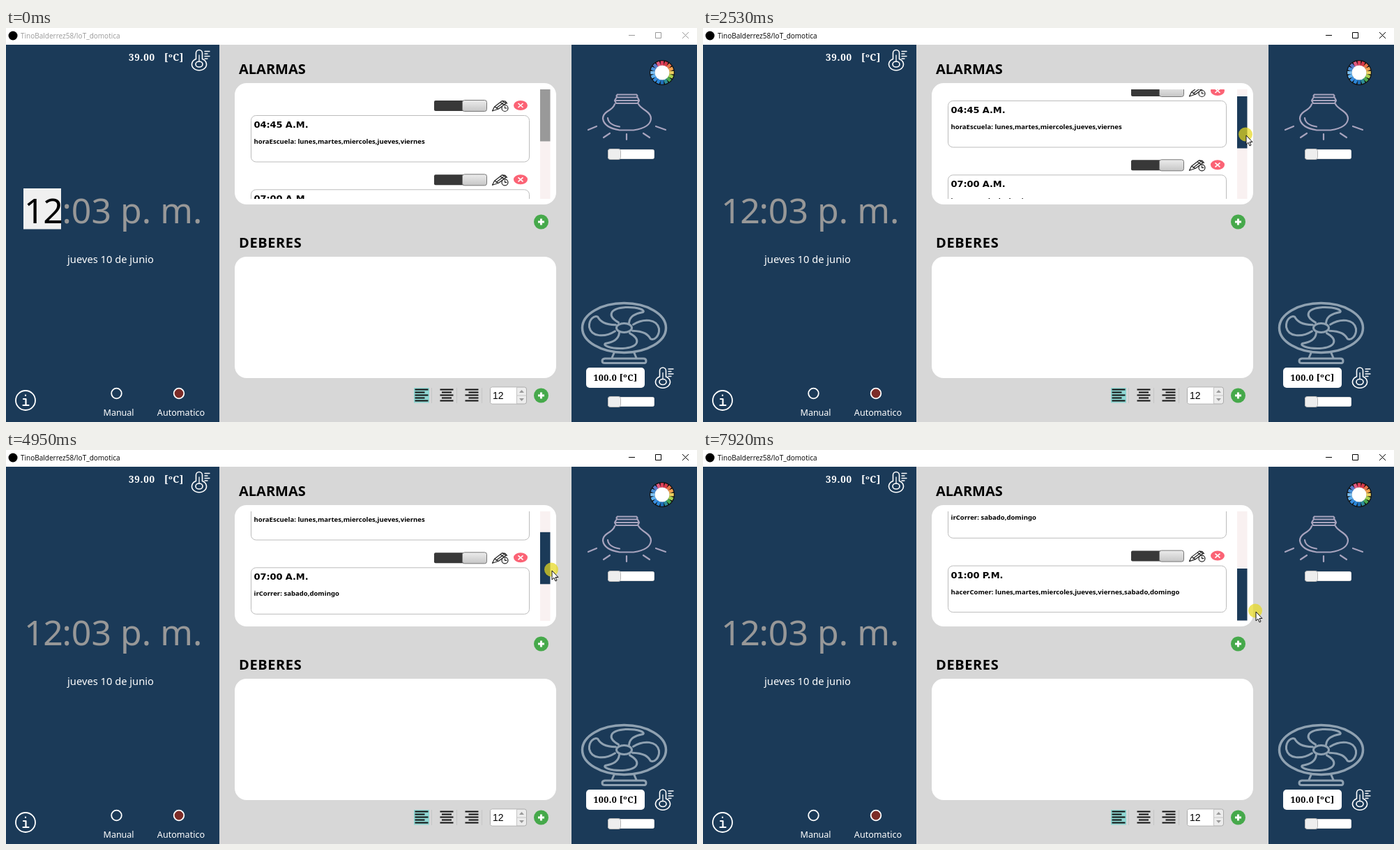
An HTML page that plays this animation: 991 px wide and 565 px high, repeating every 8 s.

```html
<!DOCTYPE html>
<html lang="es">
<head>
<meta charset="utf-8">
<style>
  html, body { margin: 0; width: 100%; height: 100%; overflow: hidden; }
  svg { display: block; width: 991px; height: 565px; font-family: "Noto Sans", sans-serif; }
  .line { fill: none; stroke-linecap: round; stroke-linejoin: round; }
  .bold { font-weight: 700; }
  .mid { text-anchor: middle; }
  .serif { font: 700 13.5px "Noto Serif", serif; }
  .time { font: 700 13px "DejaVu Sans", sans-serif; letter-spacing: -.1px; }
  .desc { font-weight: 700; font-size: 9.55px; }
  #frame { color: #999; }
  #thumb { fill: #999; }
  .active #frame { color: #000; }
  .active #thumb { fill: #1b3a58; }
  .active #hour { fill: #989898; }
  .active #mark { display: none; }
</style>
</head>
<body>
<svg id="app" viewBox="0 0 991 565">
  <defs>
    <linearGradient id="knob" x2="0" y2="1">
      <stop stop-color="#ececec"/><stop offset="1" stop-color="#c6c6c6"/>
    </linearGradient>
    <clipPath id="view"><rect x="351" y="88" width="430" height="157"/></clipPath>
    <g id="thermo" class="line" stroke="#fff" stroke-width="1.6">
      <path d="M-4.5-7.5V-16a4.5 4.5 0 0 1 9 0V-7.5A10.5 8.5 0 1 1-4.5-7.5Z"/>
      <ellipse rx="5" ry="4"/>
      <path d="M0-4V-13M8-18.5h7M8-15h4M8-11.5h7M8-8h4" stroke-width="1.3"/>
    </g>
    <g id="plus">
      <circle r="10.5" fill="#46a94b"/>
      <path d="M-4.5 0h9M0-4.5v9" stroke="#fff" stroke-width="3"/>
    </g>
    <g id="slider">
      <rect x=".5" y=".5" width="66" height="13" rx="2" fill="#fff" stroke="#ddd"/>
      <rect x=".5" y="-.5" width="18" height="15" rx="3" fill="#eee" stroke="#b5b5b5"/>
    </g>
    <g id="tools">
      <rect x="614" y="104" width="46" height="15" rx="2" fill="#383838"/>
      <rect x="654.5" y="103.500" width="35" height="16" rx="3" fill="url(#knob)" stroke="#777"/>
      <g class="line" stroke="#222" stroke-width="1.2">
        <path d="M697.500 119l3-6 11-8.500 5.500 3.500-10.500 8zM701 113l5 3M703 115l10-7.500M709 106.500l5 3.500M712 104.500l4 .5 2.500 3"/>
        <circle cx="715.500" cy="115" r="4.500" fill="#fff"/>
        <path d="M715.500 112.500v2.500h2.500"/>
      </g>
      <ellipse cx="738" cy="111" rx="10" ry="7" fill="#fb6375"/>
      <path d="M734.500 108l7 6m0-6l-7 6" stroke="#fff" stroke-width="1.600"/>
      <rect x="351.500" y="125.500" width="399" height="66.500" rx="7" fill="#fff" stroke="#bcbcbc"/>
    </g>
    <path id="blade" d="M-8-13C-24-28-22-47 2-50C20-51 31-43 27-38C15-34 8-28 7-12" vector-effect="non-scaling-stroke"/>
  </defs>

  <rect width="991" height="565" fill="#fff"/>
  <rect y="24" width="991" height="541" fill="#1b3a58"/>
  <rect x="306" y="24" width="505" height="541" fill="#d7d7d7"/>

  <circle cx="10" cy="11" r="6.500" fill="#000"/>
  <g id="frame">
    <text x="21" y="14.500" font-size="10" font-family="Open Sans, sans-serif" fill="currentColor">TinoBalderrez58/IoT_domotica</text>
    <path d="M893 10.500h9M931.500 6.500h8v8h-8zM970 6l9 9m0-9l-9 9" fill="none" stroke="currentColor"/>
  </g>

  <g fill="#fff">
    <text class="serif" x="176" y="47" letter-spacing=".7">39.00</text>
    <text class="serif" x="227" y="47" letter-spacing=".4">[ºC]</text>
    <text class="mid" x="150" y="337" font-size="14.700">jueves 10 de junio</text>
    <text class="mid" x="161.500" y="555.500" font-size="12.600" letter-spacing="-.1">Manual</text>
    <text class="mid" x="251" y="555.500" font-size="12.600">Automatico</text>
  </g>
  <use href="#thermo" x="277" y="52"/>
  <rect id="mark" x="25" y="230" width="54" height="58.500" fill="#f0f0f0"/>
  <text x="26" y="280" font-size="50" fill="#989898"><tspan id="hour" fill="#000" letter-spacing="-1.400">12</tspan>:03 p. m.</text>
  <g class="line" stroke="#fff" stroke-width="1.800">
    <circle cx="28" cy="534" r="14"/>
    <path d="M25 532h3.500v9M24.500 541h8M28 526.500v.5" stroke-width="2.200"/>
    <circle cx="158.500" cy="524" r="7.300"/>
    <circle cx="248" cy="524" r="7.300" fill="#7c2c28"/>
  </g>

  <text class="bold" x="334" y="66" font-size="20">ALARMAS</text>
  <text class="bold" x="334" y="314.500" font-size="20" letter-spacing=".6">DEBERES</text>
  <rect x="328" y="79" width="461" height="174" rx="17" fill="#fff"/>
  <rect x="328" y="328" width="461" height="174" rx="17" fill="#fff"/>
  <g clip-path="url(#view)"><g id="list"></g></g>
  <rect x="766" y="88" width="14.500" height="157" fill="#f9f1f1"/>
  <rect id="thumb" x="766" y="88" width="14.500" height="74.500"/>
  <use href="#plus" x="767.500" y="278"/>
  <use href="#plus" x="767.500" y="527"/>

  <rect x="585" y="516" width="22" height="21.500" fill="#8fd6d2"/>
  <path d="M610.500 516v22M646.500 516v22M682.500 516v22" stroke="#c5c5c5"/>
  <g id="aligns" stroke="#111" stroke-width="2"></g>
  <rect x="694.500" y="515" width="52" height="24" rx="3" fill="#ececec" stroke="#aaa"/>
  <path d="M697 515.500h35v23h-35q-2 0-2-2v-19q0-2 2-2z" fill="#fff"/>
  <path d="M732.500 515v24M732.500 527h14" stroke="#c4c4c4"/>
  <path d="M736 523l3.500-4 3.500 4zM736 531l3.500 4 3.500-4z" fill="#999"/>
  <text x="698" y="532" font-size="14" font-family="Liberation Sans, sans-serif">12</text>

  <g transform="translate(941 64)">
    <circle r="18" fill="#111"/>
    <g id="wheel" fill="none" stroke-width="6.500"></g>
    <circle r="10.500" fill="#fff"/>
  </g>
  <g class="line" stroke="#a7a3bd" stroke-width="2.200">
    <path d="M877 95.500h27q3 2 0 4h-27q-3-2 0-4M874 104h33M875 100.500l-2 3.500 2 4h31l2-4-2-4M873 109Q872 114 862 120Q856 124 856 130Q858 143 880 146.500H900Q924 143 925 130Q925 124 918 119Q909 113 907 109"/>
    <path d="M863 129Q864 139 880 141.500M835 146l12-5M857 157l9-6M890 152v8M914 151l9 6M932 141l14 5"/>
  </g>
  <use href="#slider" x="863" y="174"/>
  <g class="line" stroke="#8fa1b1" stroke-width="3">
    <ellipse cx="886.500" cy="430" rx="60" ry="35.500" stroke-width="3.500"/>
    <g id="fan" transform="translate(886.500 430) scale(1 .59)"></g>
    <ellipse cx="886.500" cy="430" rx="11" ry="6.500"/>
    <path d="M872 466l-3 7M901 466l3 7M859 474h55q4 0 4 3.500t-4 3h-55q-4 0-4-3t4-3.500z"/>
  </g>
  <rect x="832" y="487" width="84" height="29" rx="5" fill="#fff"/>
  <text class="serif mid" x="874" y="506" style="font-size:12.500px" letter-spacing=".4">100.0 [ºC]</text>
  <use href="#thermo" x="942" y="507.500"/>
  <use href="#slider" x="863" y="529"/>

  <g id="cursor">
    <circle cx="-1" cy="-1.500" r="10" fill="#e6d820" fill-opacity=".72"/>
    <path d="M0 0V13L3 10.200L5 15L7 14L5 9.500H9Z" fill="#fff" stroke="#111" stroke-width="1"/>
  </g>
</svg>
<script>
const $ = id => document.getElementById(id);

const alarms = [
  ['04:45 A.M.', 'horaEscuela: lunes,martes,miercoles,jueves,viernes'],
  ['07:00 A.M.', 'irCorrer: sabado,domingo'],
  ['01:00 P.M.', 'hacerComer: lunes,martes,miercoles,jueves,viernes,sabado,domingo']
];
$('list').innerHTML = alarms.map(([time, desc], i) => `
  <g transform="translate(0 ${i * 106.3})"><use href="#tools"/>
  <text class="time" x="355.5" y="143">${time}</text>
  <text class="desc" x="355.5" y="166">${desc}</text></g>`).join('');

// Text alignment buttons: left, centre, right
$('aligns').innerHTML = [0, 1, 2].map(k => [0, 1, 2, 3, 4].map(i => {
  const width = i % 2 ? 14 : 19;
  const x = 586.5 + k * 36 + (19 - width) * k / 2;
  return `<path d="M${x} ${518.5 + i * 4}h${width}"/>`;
}).join('')).join('');

const hues = ['#e0405a', '#d93a4a', '#e8734a', '#f0a050', '#ecd060', '#a8d050', '#4caa50', '#2e8f9a',
  '#1f6fb8', '#2b86d8', '#3a8fe0', '#5fb0f0', '#7cc0f4', '#4a90d8', '#5a78c8', '#e05a80'];
$('wheel').innerHTML = hues.map((c, i) =>
  `<path d="M-2.3-13.5h4.600" stroke="${c}" transform="rotate(${i * 22.5})"/>`).join('');

$('fan').innerHTML = [0, 90, 180, 270].map(a => `<use href="#blade" transform="rotate(${a})"/>`).join('');

const LOOP = 8000, SHOW = 390, PRESS = 1730, GRAB_Y = 143.5, MAX_SCROLL = 82;
// Pointer path: time, x, y
const path = [
  [390, 905, 500], [1180, 790, 217], [1250, 789, 209], [1730, 778, GRAB_Y], [1930, 778, GRAB_Y],
  [2130, 779, 148.5], [2530, 779, 153.5], [2920, 779, 153.5], [3210, 779, 156.3], [3420, 779, 156.3],
  [3490, 779, 157], [3760, 779, 162], [4030, 779, 162], [4300, 780, 169.5], [4500, 782, 172],
  [4820, 782, 172], [5020, 783, 174], [5290, 783, 174], [5560, 784.5, 187.8], [5760, 784.5, 187.8],
  [6020, 787, 202.5], [6230, 787, 202.5], [6420, 788, 203.5], [6550, 788, 203.5], [6690, 789.5, 213],
  [6760, 790, 213.5], [6960, 790, 213.5], [7030, 791, 214], [7220, 791, 214], [7590, 793, 225.5],
  [7780, 793, 225.5], [7920, 792.5, 231.5]
];

function pointer(t) {
  const i = path.findIndex(p => p[0] > t);
  if (i === 0) return path[0].slice(1);
  if (i < 0) return path[path.length - 1].slice(1);
  const [a, b] = [path[i - 1], path[i]];
  const k = (t - a[0]) / (b[0] - a[0]);
  return [1, 2].map(j => a[j] + (b[j] - a[j]) * k);
}

function draw() {
  const t = performance.now() % LOOP;
  const [x, y] = pointer(t);
  const pressed = t >= PRESS;
  const scroll = pressed ? Math.min(MAX_SCROLL, Math.max(0, y - GRAB_Y)) : 0;
  $('app').classList.toggle('active', pressed);
  $('cursor').setAttribute('visibility', t < SHOW ? 'hidden' : 'visible');
  $('cursor').setAttribute('transform', `translate(${Math.round(x)} ${Math.round(y)})`);
  $('thumb').setAttribute('y', 88 + scroll);
  $('list').setAttribute('transform', `translate(0 ${-Math.round(scroll * 2.1)})`);
  requestAnimationFrame(draw);
}
draw();
</script>
</body>
</html>
```
